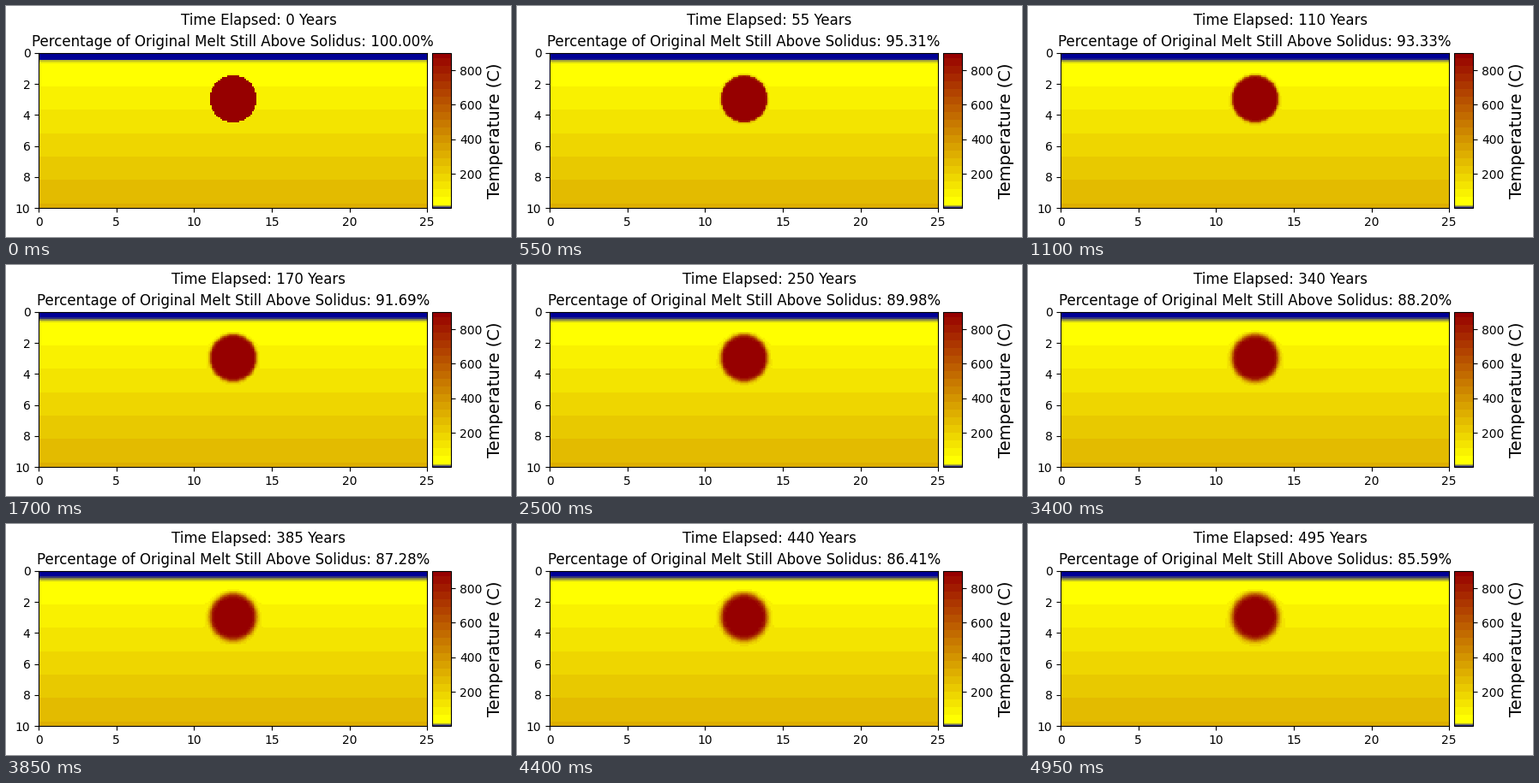
A matplotlib script for the animation above (5000 ms loop, 589 px wide and 270 px high).

```python
import numpy as np
import matplotlib.pyplot as plt
from matplotlib.animation import FuncAnimation
from matplotlib.colors import ListedColormap

W, H, DPI = 589, 270, 100
FRAMES, INTERVAL = 100, 50
YEARS_PER_STEP = 5
CELL = 0.1                    # km
DIFFUSIVITY = 31.5e-6         # km^2 per year
T_MIN, T_MAX = 1, 900
COLD_ROWS = 4                 # rows held at surface temperature

plt.rcParams["font.family"] = "DejaVu Sans"


def make_cmap():
    """Short blue-yellow ramp, then yellow to dark red in even bands."""
    blue, yellow, red = np.array([[0, 0, 150], [255, 255, 0], [150, 0, 0]]) / 255
    start, band, last = 19.7, 44.8, 19
    colors = []
    for temp in np.linspace(T_MIN, T_MAX, 900):
        if temp < start:
            f = (temp - T_MIN) / (start - T_MIN)
            colors.append(blue + (yellow - blue) * f)
        else:
            f = min((temp - start) // band, last) / last
            colors.append(yellow + (red - yellow) * f)
    return ListedColormap(colors)


def initial_field():
    rows, cols = 100, 250
    depth = np.arange(rows) * CELL
    field = np.tile((30 * depth)[:, None], (1, cols))
    field[:5] = 0
    z, x = (np.mgrid[:rows, :cols] + 0.5) * CELL
    field[(x - 12.5) ** 2 + (z - 3) ** 2 < 1.5 ** 2] = T_MAX
    return field


def diffuse(field):
    rate = DIFFUSIVITY * YEARS_PER_STEP / CELL ** 2
    p = np.pad(field, 1, mode="edge")
    lap = p[:-2, 1:-1] + p[2:, 1:-1] + p[1:-1, :-2] + p[1:-1, 2:] - 4 * field
    lap[:COLD_ROWS] = 0
    lap[-1] = 0
    return field + rate * lap


def melt_percent(year):
    """Melt loss grows close to the square root of time."""
    years = [0, 55, 170, 250, 300, 385, 495]
    percent = [100, 95.31, 91.69, 89.98, 89.07, 87.28, 85.59]
    return np.interp(np.sqrt(year), np.sqrt(years), percent)


def add_axes(left, top, width, height):
    return fig.add_axes([left / W, 1 - (top + height) / H, width / W, height / H])


fields = [initial_field()]
for _ in range(FRAMES - 1):
    fields.append(diffuse(fields[-1]))

fig = plt.figure(figsize=(W / DPI, H / DPI), dpi=DPI, facecolor="white")
ax = add_axes(38.1, 55, 453.1, 181.2)
cax = add_axes(496.5, 55, 22.6, 181.2)

im = ax.imshow(fields[0], cmap=make_cmap(), vmin=T_MIN, vmax=T_MAX,
               extent=[0, 25, 10, 0], aspect="auto", interpolation="nearest")
ax.set_xticks(range(0, 26, 5))
ax.set_yticks(range(0, 11, 2))

bar = fig.colorbar(im, cax=cax, ticks=[200, 400, 600, 800])
bar.set_label("Temperature (C)", size=14)

clock = fig.text(0.5, 248 / H, "", size=12, ha="center", va="baseline")
title = ax.set_title("", size=12)


def update(i):
    year = i * YEARS_PER_STEP
    im.set_data(fields[i])
    clock.set_text(f"Time Elapsed: {year} Years")
    title.set_text("Percentage of Original Melt Still Above Solidus: "
                   f"{melt_percent(year):.2f}%")
    return im, clock, title


anim = FuncAnimation(fig, update, frames=FRAMES, interval=INTERVAL,
                     repeat=True, repeat_delay=0, blit=False)
plt.show()
```
